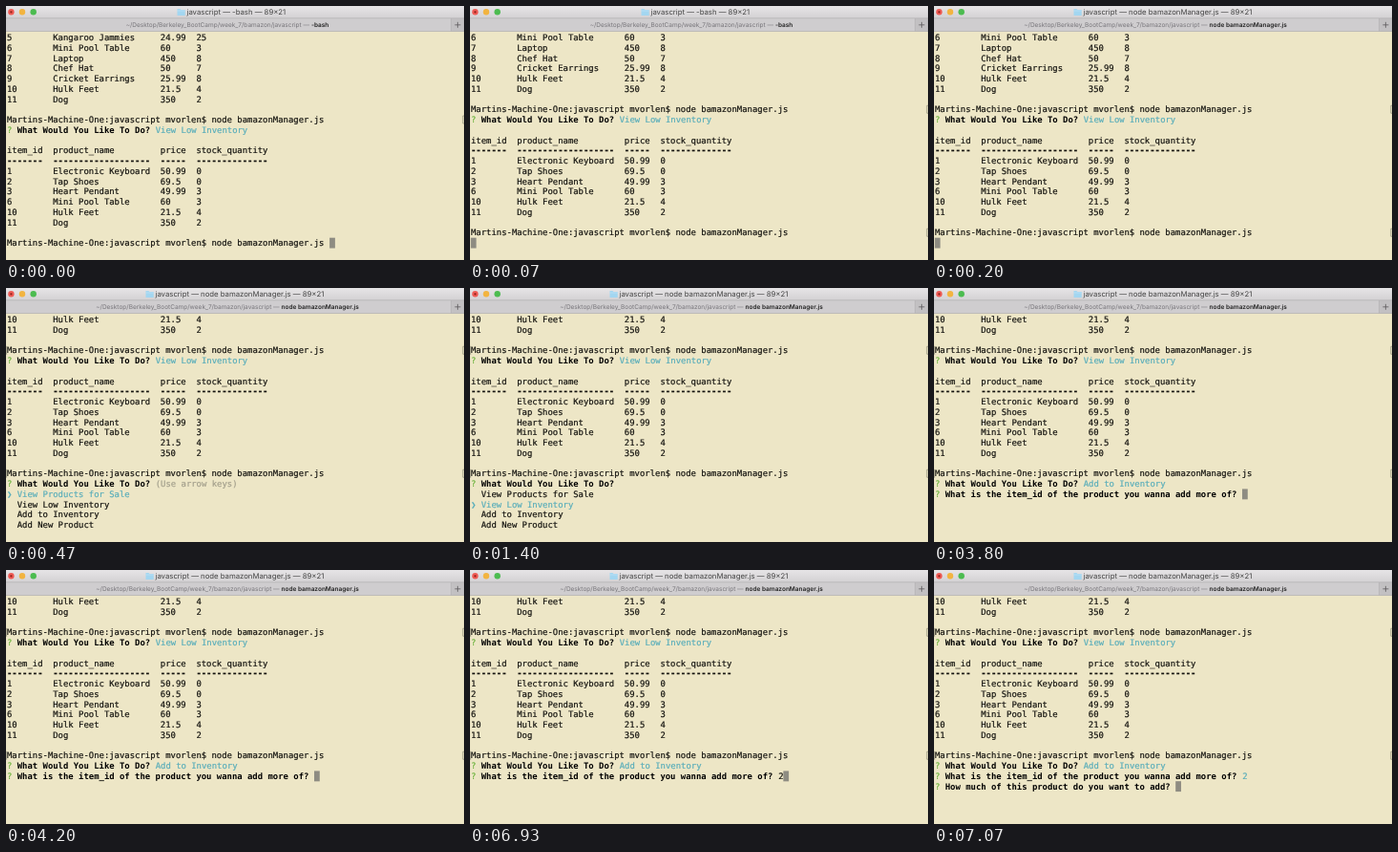
Animation, 480 px wide and 266 px high, one loop 8000 ms. Source, as an HTML page:

```html
<!DOCTYPE html>
<html lang="en">
<head>
<meta charset="utf-8">
<title>Terminal</title>
<style>
  html, body { margin: 0; width: 100%; height: 100%; overflow: hidden; background: #ede6c6; }
  svg { display: block; width: 100vw; height: 100vh; }
  text { white-space: pre; text-rendering: geometricPrecision; }
  #screen text { font: 8.92px "DejaVu Sans Mono", monospace; fill: #14130f; stroke: #14130f; stroke-width: .2; }
  #screen .bold { font-weight: 700; fill: #000; stroke: none; }
  #screen .rule { font-weight: 700; }
  #screen .green { fill: #6db33f; stroke: #6db33f; }
  #screen .cyan { fill: #58adba; stroke: #58adba; }
  #screen .dim { fill: #a29e8b; stroke: #a29e8b; }
  #bar text { font-family: Inter, "Open Sans", sans-serif; }
  #bar .title { font-size: 7.75px; fill: #444; }
  #bar .path { font-size: 6.5px; fill: #77757a; text-anchor: middle; }
  #bar .job { font-weight: 600; fill: #222; }
</style>
</head>
<body>
<svg viewBox="0 0 480 266" preserveAspectRatio="none">
  <defs>
    <linearGradient id="chrome" x2="0" y2="1">
      <stop stop-color="#e6e4e6"/>
      <stop offset="1" stop-color="#d3d1d3"/>
    </linearGradient>
  </defs>
  <rect width="480" height="266" fill="#ede6c6"/>
  <rect width="480" height="13" fill="url(#chrome)"/>
  <rect y="13" width="480" height="13.5" fill="#cfcdcf"/>
  <rect x="467" y="13" width="13" height="13.5" fill="#c2c0c2"/>
  <path d="M0 12.8H480M0 26.5H480M466.5 13V26.5" stroke="#b1afb1" stroke-width=".7"/>
  <path d="M470.4 19.8h6M473.4 16.8v6" stroke="#5c5a5c" stroke-width=".8"/>
  <circle cx="5.4" cy="6.3" r="3.2" fill="#ee5a54"/>
  <circle cx="5.4" cy="6.3" r="1.1" fill="#8c1f18"/>
  <circle cx="17" cy="6.3" r="3.2" fill="#f2b440"/>
  <circle cx="28.7" cy="6.3" r="3.2" fill="#4cbc50"/>
  <g id="bar"></g>
  <g id="screen"></g>
</svg>
<script>
const LOOP = 8000, CW = 5.37, LH = 10.75, LEFT = 1;
const bar = document.getElementById('bar');
const screen = document.getElementById('screen');

const span = (text, cls = '') => ({ text, cls });
const row = (id, name, price, stock, cls) =>
  [span(id.padEnd(9) + name.padEnd(21) + price.padEnd(7) + stock, cls)];
const ask = (question, ...rest) =>
  [span('?', 'green'), span(' ' + question + ' ', 'bold'), ...rest];
const prompt = () => {
  const line = [span('Martins-Machine-One:javascript mvorlen$ node bamazonManager.js ')];
  line.mark = true;
  return line;
};

const MENU = 'What Would You Like To Do?';
const OPTIONS = ['View Products for Sale', 'View Low Inventory', 'Add to Inventory', 'Add New Product'];
const HISTORY = [
  row('5', 'Kangaroo Jammies', '24.99', '25'),
  row('6', 'Mini Pool Table', '60', '3'),
  row('7', 'Laptop', '450', '8'),
  row('8', 'Chef Hat', '50', '7'),
  row('9', 'Cricket Earrings', '25.99', '8'),
  row('10', 'Hulk Feet', '21.5', '4'),
  row('11', 'Dog', '350', '2'),
  [],
  prompt(),
  ask(MENU, span('View Low Inventory', 'cyan')),
  [],
  row('item_id', 'product_name', 'price', 'stock_quantity'),
  row('-'.repeat(7), '-'.repeat(19), '-'.repeat(5), '-'.repeat(14), 'rule'),
  row('1', 'Electronic Keyboard', '50.99', '0'),
  row('2', 'Tap Shoes', '69.5', '0'),
  row('3', 'Heart Pendant', '49.99', '3'),
  row('6', 'Mini Pool Table', '60', '3'),
  row('10', 'Hulk Feet', '21.5', '4'),
  row('11', 'Dog', '350', '2'),
  [],
  prompt()
];

const cursor = { cursor: true };

function menu(picked, hint) {
  return [
    ask(MENU, ...(hint ? [span('(Use arrow keys)', 'dim')] : [])),
    ...OPTIONS.map((name, i) => i === picked
      ? [span('❯ ' + name, 'cyan')]
      : [span('  ' + name)])
  ];
}

function form(...fields) {
  return [ask(MENU, span('Add to Inventory', 'cyan')), ...fields];
}

const WHICH = 'What is the item_id of the product you wanna add more of?';
const STEPS = [
  { at: 0, top: 0, tail: [], typing: true },
  { at: 70, top: 1, tail: [[cursor]] },
  { at: 470, top: 5, tail: menu(0, true) },
  { at: 1400, top: 5, tail: menu(1) },
  { at: 1600, top: 5, tail: menu(2) },
  { at: 2130, top: 5, tail: form(ask(WHICH, cursor)) },
  { at: 6930, top: 5, tail: form(ask(WHICH, span('2'), cursor)) },
  { at: 7000, top: 5, tail: form(
    ask(WHICH, span('2', 'cyan')),
    ask('How much of this product do you want to add?', cursor)) }
];

function drawLine(line, r) {
  const y = 36.2 + r * LH, top = 27.7 + r * LH;
  let col = 0, out = '';
  for (const part of line) {
    const x = LEFT + col * CW;
    if (part.cursor) {
      out += `<rect x="${x - .2}" y="${top}" width="${CW + .4}" height="10.9" fill="#8e8c82"/>`;
    } else {
      out += `<text x="${x}" y="${y}" class="${part.cls}">${part.text}</text>`;
      col += part.text.length;
    }
  }
  return out;
}

function drawMarks(r, both) {
  const y = 29 + r * LH;
  const right = `M480 ${y}h-1.2v8h1.2`;
  const left = both ? `M1.2 ${y}h-.8v8h.8` : '';
  return `<path d="${right}${left}" fill="none" stroke="#8f8b78" stroke-width=".7"/>`;
}

function drawScreen({ top, tail, typing }) {
  const lines = [...HISTORY.slice(top), ...tail];
  if (typing) lines.push([...lines.pop(), cursor]);
  return lines.map((line, r) =>
    drawLine(line, r) + (line.mark ? drawMarks(r, top > 1) : '')).join('');
}

function drawBar(running) {
  const job = running ? 'node bamazonManager.js' : '-bash';
  const x = running ? 156.5 : 189.5;
  return `<path d="M${x - 10} 2.9h3l.9 1h4.3v6h-8.2z" fill="#a3d6f0"/>
    <path d="M${x - 10} 5h8.2" stroke="#c3e5f6" stroke-width=".6"/>
    <text class="title" x="${x}" y="9.2">javascript — ${job} — 89×21</text>
    <text class="path" x="232" y="22.2">~/Desktop/Berkeley_BootCamp/week_7/bamazon/javascript — <tspan class="job">${job}</tspan></text>`;
}

let shownStep, shownJob;
function render(t) {
  const step = STEPS.filter(s => s.at <= t).pop();
  const running = t >= 133;
  if (step !== shownStep) screen.innerHTML = drawScreen(shownStep = step);
  if (running !== shownJob) bar.innerHTML = drawBar(shownJob = running);
}

const start = performance.now();
function tick() {
  render((performance.now() - start) % LOOP);
  requestAnimationFrame(tick);
}
tick();
</script>
</body>
</html>
```
